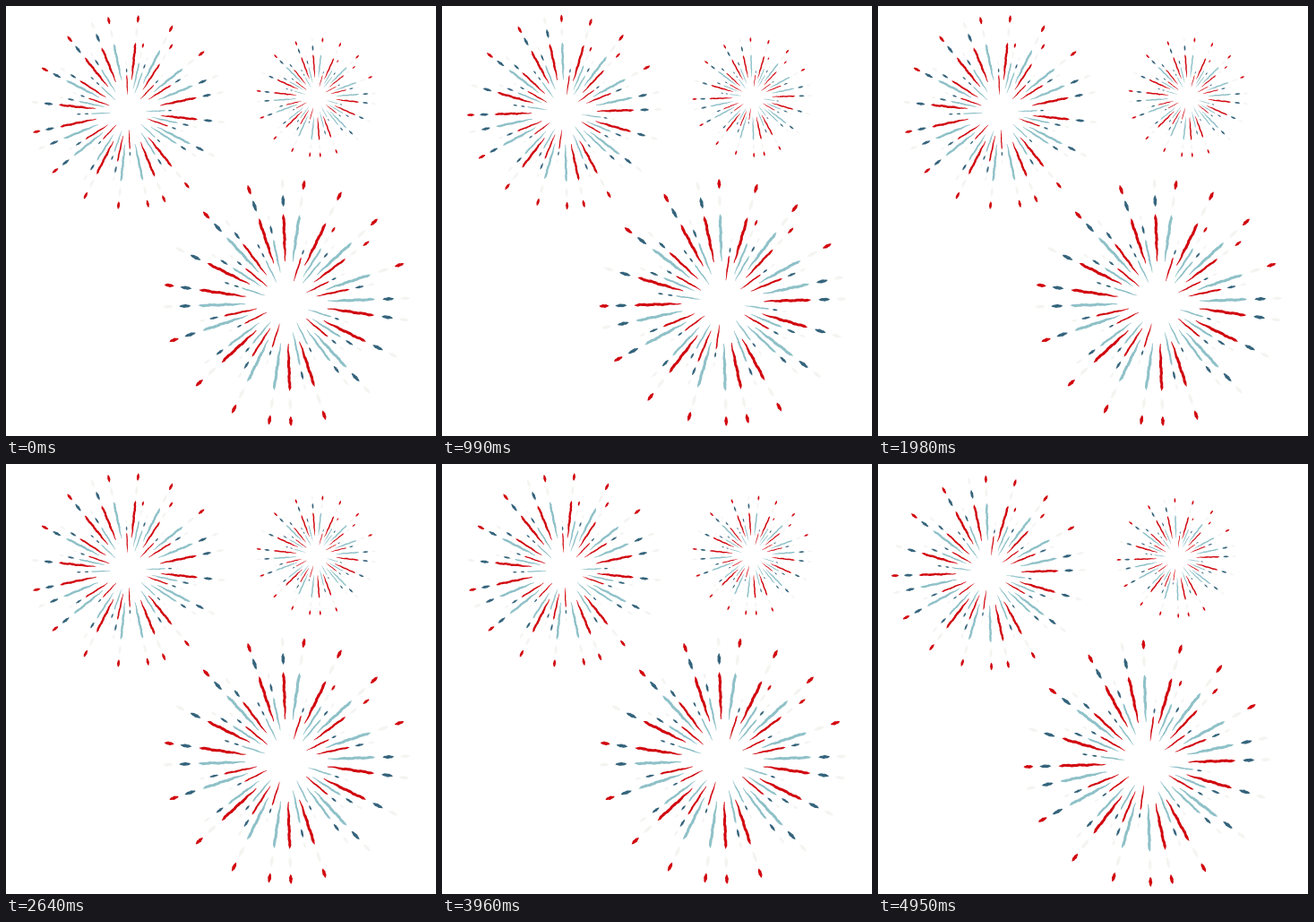
An HTML page with a canvas that plays this animation: 480x480 px, repeating every 5.28 s.

```html
<!DOCTYPE html>
<html>
<head>
<meta charset="utf-8">
<title>Fireworks</title>
<style>
  html, body { margin: 0; width: 100%; height: 100%; overflow: hidden; background: #fff; }
  canvas { display: block; width: 100%; height: 100%; }
</style>
</head>
<body>
<canvas id="stage" width="480" height="480"></canvas>
<script>
const ctx = document.getElementById('stage').getContext('2d');
const STEP = 330, STEPS = 16;
const COLORS = { R: '#d1070f', T: '#8fc1c8', N: '#35647c', W: '#f4f4f1' };

// Each ring repeats every quarter turn: a long stroke, a dash and a tip,
// with one colour triple per quarter. Angles run clockwise from the top.
const OUTER = [46, 99, 107, 120, 127, 138];
const MIDDLE = [34, 72, 78, 88, 93, 100];
const INNER = [25, 53, 56, 62, 67, 73];
const rings = [
  { angle: -18.4, width: 3.1, parts: OUTER, colors: 'RNR TWR RWR TNR' },
  { angle: -2,    width: 3.1, parts: OUTER, colors: 'RNW TNW RWR TNW' },
  { angle: 8.3,   width: 3.1, parts: OUTER, colors: 'TWR RNW TWR RNR' },
  { angle: 26.3,  width: 3.1, parts: OUTER, colors: 'RWR RNW TWR RNW' },
  { angle: 47.4,  width: 3.1, parts: OUTER, colors: 'TWR TNW RWR TNR' },
  { angle: 53.4,  width: 2.4, parts: [38, 82, 88, 98, 106, 115], colors: 'RWR TNW TNW RNW' },
  { angle: 32.7,  width: 2.1, parts: MIDDLE, colors: 'TWR TNW RNW TNW' },
  { angle: -12,   width: 2.1, parts: MIDDLE, colors: 'TNW RNW TNW RNW' },
  { angle: 39.7,  width: 1.8, parts: [28, 60, 65, 72, 77, 83], colors: 'TNW RNW TNW RNW' },
  { angle: 18,    width: 1.6, parts: INNER, colors: 'RNW TNW RNW TNN' },
  { angle: -26.5, width: 1.6, parts: INNER, colors: 'TNN RNW TNW RNW' }
];

// turn: the two orientations each burst alternates between
const bursts = [
  { x: 313.3, y: 331,   scale: 1,     turn: [0, -10] },
  { x: 136.5, y: 118.5, scale: 0.789, turn: [-20.3, -10] },
  { x: 346.3, y: 102,   scale: 0.486, turn: [-2, -10] }
];

// Brush mark from radius a to b: strokes taper inwards, dashes at both ends.
function brushPath(a, b, width, seed) {
  const path = new Path2D();
  const length = b - a;
  const isLong = length > 20;
  const count = isLong ? Math.round(length / 1.5) : 10;
  const edge = (i, side) => {
    const t = i / count;
    const body = isLong
      ? Math.min(1, 0.25 + t * 2) * Math.min(1, (1 - t) * 14)
      : Math.pow(Math.sin(Math.PI * t), 0.75);
    const sway = isLong ? 0.1 * width * Math.sin(t * length * 0.4 + seed * 2.3) : 0;
    const rough = 1 + 0.12 * Math.sin(i * 1.7 + seed * 5.1 + side);
    path.lineTo(sway + side * width / 2 * body * rough, -(a + length * t));
  };
  for (let i = 0; i <= count; i++) edge(i, -1);
  for (let i = count; i >= 0; i--) edge(i, 1);
  path.closePath();
  return path;
}

const marks = rings.flatMap(({ angle, width, parts, colors }, r) =>
  colors.split(' ').flatMap((triple, quarter) =>
    [...triple].map((color, k) => ({
      color: COLORS[color],
      angle: angle + quarter * 90,
      path: brushPath(parts[2 * k], parts[2 * k + 1],
        width * (k ? 1.2 : 1), r * 7 + quarter * 3 + k)
    }))));

const radians = degrees => degrees * Math.PI / 180;

function drawBurst({ x, y, scale, turn }, pose) {
  ctx.save();
  ctx.translate(x, y);
  ctx.scale(scale, scale);
  ctx.rotate(radians(turn[pose]));
  for (const { color, angle, path } of marks) {
    ctx.save();
    ctx.rotate(radians(angle));
    ctx.fillStyle = color;
    ctx.fill(path);
    ctx.restore();
  }
  ctx.restore();
}

function draw() {
  const step = Math.floor(performance.now() / STEP) % STEPS;
  ctx.clearRect(0, 0, 480, 480);
  ctx.save();
  if (step >= 14) ctx.translate(-13, 3); // the last two steps jump aside
  bursts.forEach(burst => drawBurst(burst, step % 2));
  ctx.restore();
  requestAnimationFrame(draw);
}
draw();
</script>
</body>
</html>
```
